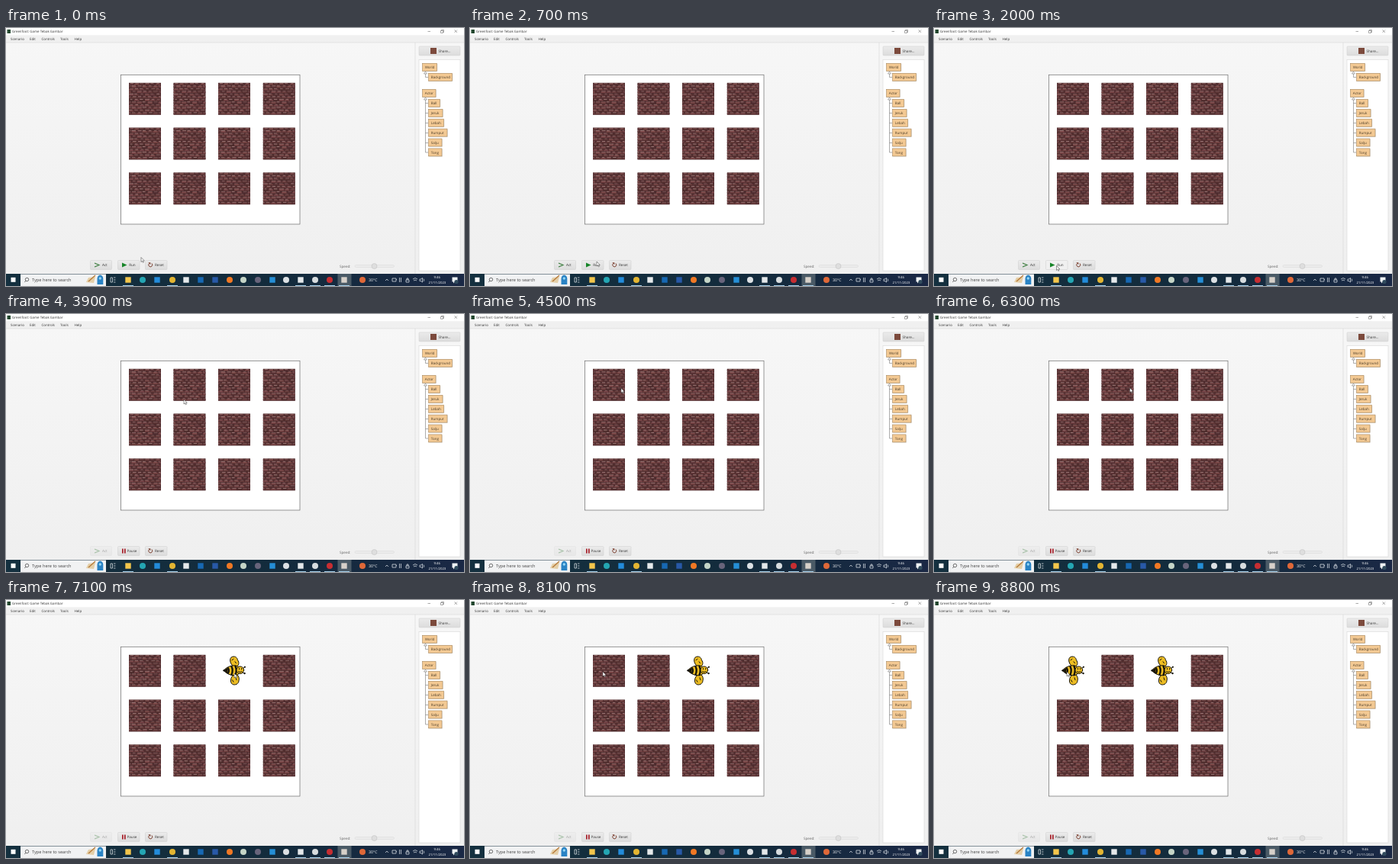
Animation, 600 px wide and 338 px high, one loop 9 s. Source, as an HTML page:

```html
<!DOCTYPE html>
<html lang="id">
<head>
<meta charset="utf-8">
<title>Game Tebak Gambar</title>
<style>
  html, body { margin: 0; width: 100%; height: 100%; overflow: hidden; background: #f4f4f4; }
  svg { display: block; width: 100vw; height: 100vh; }
  text { font-family: "Open Sans", "Noto Sans", sans-serif; text-rendering: geometricPrecision; white-space: pre; }
</style>
</head>
<body>
<svg id="stage" viewBox="0 0 600 338" preserveAspectRatio="none">
  <defs>
    <linearGradient id="paper" x2="0" y2="1"><stop stop-color="#f7f7f7"/><stop offset="1" stop-color="#efefef"/></linearGradient>
    <linearGradient id="button" x2="0" y2="1"><stop stop-color="#ebebeb"/><stop offset="1" stop-color="#dcdcdc"/></linearGradient>
    <linearGradient id="bar"><stop stop-color="#14303f"/><stop offset=".6" stop-color="#132b3c"/><stop offset="1" stop-color="#1a2845"/></linearGradient>
    <g id="wall"></g>
    <g id="bee" stroke="#14120c" stroke-width="1" stroke-linejoin="round" stroke-linecap="round">
      <path fill="#ecbc22" d="M20 15C15 12 14 4 18.500 2.500C23 1.500 25 4 25.500 7C28 10 27 14 24.500 15.500Z"/>
      <path fill="#ecbc22" d="M20.500 26C16 29 15 36 18.500 38.500C22 40.500 27 38 27 34C28 31 27 28 25 26Z"/>
      <path fill="#ecbc22" d="M7 20.500Q13 14 21 14Q28 14 29 20.500Q28 27 21 27Q13 27 7 20.500Z"/>
      <path fill="none" stroke-width="2.300" d="M13 17.500Q14.800 20.500 13 24M17.500 15.500Q20 20.500 17.500 26M22.500 15Q25 20.500 22.500 26.500"/>
      <path fill="#14120c" d="M7 20.500L12 18V23.500Z"/>
      <circle cx="28.800" cy="20" r="4.800" fill="#ecbc22"/>
      <path fill="none" d="M18 7L20 5.500M22 9L23.500 11M18.500 33L20 35.500M23 30L24 33M27.500 17.800V19M30.500 17.800V19M26.500 22Q29 24 31 22M32.500 18L34.500 16M32 23L34.500 24.500"/>
      <circle cx="34.800" cy="16" r=".6" fill="#14120c"/><circle cx="34.500" cy="24.300" r=".7" fill="#14120c"/>
    </g>
  </defs>

  <rect width="600" height="338" fill="url(#paper)"/>
  <rect width="600" height="9.500" fill="#fff"/>
  <rect y="9.500" width="600" height="9.500" fill="#f0f0f0"/>
  <path d="M0 19H600M536 19V322" stroke="#dadada" stroke-width=".7"/>
  <rect x="1.500" y="2" width="4.500" height="5" fill="#23482f"/>
  <path d="M552.500 4.500H556M569.500 3.500H572.500V6.500H569.500ZM570.500 3.500V2.500H573.500V5.500H572.500M587.500 2.500L591 6M591 2.500L587.500 6" fill="none" stroke="#555" stroke-width=".5"/>

  <rect x="150.500" y="61.300" width="234.500" height="195.700" fill="#fff" stroke="#6c6c6c" stroke-width=".7"/>
  <g id="cards"></g>

  <rect x="541" y="24" width="54" height="12" rx="1" fill="url(#button)" stroke="#cdcdcd" stroke-width=".5"/>
  <rect x="556" y="26" width="8" height="8" fill="#7c4a3c"/>
  <rect x="541" y="41.500" width="54" height="276.500" fill="#fff" stroke="#d8d8d8" stroke-width=".6"/>
  <path d="M549.500 60V64.500H553M549.500 94V163H553M549.500 98.500H553M549.500 111.500H553M549.500 124.500H553M549.500 137.500H553M549.500 150.500H553" fill="none" stroke="#777" stroke-width=".6"/>
  <path d="M549.500 57L547.500 60H551.500ZM549.500 91L547.500 94H551.500Z" fill="#fff" stroke="#666" stroke-width=".5"/>
  <g id="classes"></g>

  <g fill="url(#button)" stroke="#cdcdcd" stroke-width=".5">
    <rect id="runBox" x="146.500" y="304.500" width="28.500" height="12" rx="1"/>
    <rect x="182.500" y="304.500" width="28.500" height="12" rx="1"/>
  </g>
  <g id="act">
    <rect x="110.500" y="304.500" width="28" height="12" rx="1" fill="url(#button)" stroke="#cdcdcd" stroke-width=".5"/>
    <path d="M116 308L122 310.500L116 313" fill="none" stroke="#397b3c" stroke-width="1.100"/>
  </g>
  <g id="run"><path d="M152 307.500V313.500L158.500 310.500Z" fill="#168428"/></g>
  <g id="pause"><path d="M152 307.500H153.700V313.500H152ZM155 307.500H156.700V313.500H155Z" fill="#a8202a"/></g>
  <path d="M187.500 308.500A2.500 2.500 0 1 0 191 308.500" fill="none" stroke="#7c4030" stroke-width="1"/>
  <path d="M186.300 307.300H189.300V310Z" fill="#7c4030"/>
  <rect x="457" y="310.500" width="51.500" height="3" rx="1.500" fill="#ececec" stroke="#d6d6d6" stroke-width=".5"/>
  <circle cx="482.500" cy="312" r="3.500" fill="#dedede" stroke="#bcbcbc" stroke-width=".5"/>

  <rect y="322" width="600" height="16" fill="url(#bar)"/>
  <rect x="19" y="322.500" width="112" height="15.500" fill="#f1f2f3"/>
  <rect x="6.500" y="326.800" width="6" height="6" fill="#fff"/>
  <path d="M26 331.200L24.300 333" stroke="#333" stroke-width=".7"/>
  <circle cx="27.500" cy="329.500" r="2.200" fill="none" stroke="#333" stroke-width=".7"/>
  <path d="M105 333L108 327L117 326L115 334Z" fill="#e4cfa8"/><path d="M108 332L117 324" stroke="#b77a38" stroke-width="1.400"/>
  <path d="M119.500 336V328Q120 324 123.300 323.500Q127 324 127.300 328V336Z" fill="#2a83c4"/><circle cx="123.300" cy="328" r="1.700" fill="#93d5f4"/>
  <path d="M137 327H139.500V333H137ZM141 327H143.500M141 330H143.500M141 333H143.500" fill="none" stroke="#e8edf0" stroke-width=".7"/>
  <rect x="434.500" y="322" width="18" height="16" fill="#4a5a66"/>
  <g id="apps"></g>
  <g fill="none" stroke="#e9eef2" stroke-width=".7">
    <path d="M497 331L499 329L501 331M506 328H511V332H506ZM511 329.500H512M524 333V330H528V333ZM525 330V328H527V330M533 329Q536 326 539 329M534 331Q536 329 538 331M542 329H543.500L545.500 327.500V333L543.500 331.500H542ZM547 328.500Q548.500 330.300 547 332"/>
    <path d="M515.500 327V333M517.500 327V333"/>
  </g>
  <path d="M584.500 326.500H591.500V332.500H588L586 334.500V332.500H584.500Z" fill="#eef2f4"/>
  <circle cx="590" cy="332.500" r="2.600" fill="#304b5d"/>
  <g id="labels"></g>
  <path id="cursor" d="M0 0V6L1.400 4.700L2.400 6.800L3.400 6.300L2.500 4.400H4.300Z" fill="#fff" stroke="#333" stroke-width=".5"/>
</svg>
<script>
const $ = id => document.getElementById(id);

function add(parent, tag, attributes, content = '') {
  const node = document.createElementNS('http://www.w3.org/2000/svg', tag);
  for (const [key, value] of Object.entries(attributes)) node.setAttribute(key, value);
  node.textContent = content;
  return parent.appendChild(node);
}

const label = (parent, content, x, y, size = 4.6, fill = '#333') =>
  add(parent, 'text', { x, y, 'font-size': size, fill }, content);

let seed = 41;
function random() {
  seed = (seed * 16807) % 2147483647;
  return seed / 2147483647;
}

// Uneven bricks between broken, pale mortar lines.
function buildWall(wall) {
  const pitch = 3.5;
  add(wall, 'rect', { width: 42, height: 42, fill: '#4b2a2c' });
  for (let row = 0; row < 12; row++) {
    const y = row * pitch;
    for (let x = row % 2 ? -3.5 : 0; x < 42; x += 7) {
      const left = Math.max(0, x);
      const right = Math.min(42, x + 6.3);
      const width = right - left;
      add(wall, 'rect', {
        x: left, y: y + .9, width, height: 2,
        fill: `hsl(${356 + random() * 6} 27% ${25 + random() * 13}%)`
      });
      const start = left + random() * width * .3;
      add(wall, 'rect', {
        x: start, y: y + .1, width: (right - start) * (.6 + random() * .4), height: .9,
        fill: '#b38d8a', opacity: .4 + random() * .5
      });
    }
  }
}
buildWall($('wall'));

const columns = [161, 219.5, 278, 336.8];
const rows = [71.8, 130.5, 189.3];
const cards = rows.flatMap(y => columns.map(x => add($('cards'), 'use', { x, y })));

function classBox(name, x, y, width) {
  add($('classes'), 'rect', { x: x + .7, y: y + .7, width, height: 10, fill: '#dedad4' });
  add($('classes'), 'rect', { x, y, width, height: 10, fill: '#f3c993', stroke: '#a5875f', 'stroke-width': .6 });
  label($('classes'), name, x + 3.3, y + 6.7, 4.5, '#4a3b28');
}
classBox('World', 545.5, 46.3, 19);
classBox('Background', 553.5, 59.3, 31);
classBox('Actor', 545.5, 80.3, 17.5);
[['Ball', 15], ['Jeruk', 18.5], ['Lebah', 20], ['Rumput', 24.5], ['Salju', 17.5], ['Tong', 17.5]]
  .forEach(([name, width], i) => classBox(name, 553.5, 93.4 + i * 12.9, width));

const texts = $('labels');
label(texts, 'Greenfoot: Game Tebak Gambar', 8, 6.3, 4.42);
[['Scenario', 6], ['Edit', 31], ['Controls', 46.5], ['Tools', 71], ['Help', 89.5]]
  .forEach(([name, x]) => label(texts, name, x, 15.7, 4.45));
label(texts, 'Share...', 566.5, 31.7);
label($('act'), 'Act', 126, 312.2);
label($('run'), 'Run', 161.2, 312.2);
label($('pause'), 'Pause', 158.5, 312.2);
label(texts, 'Reset', 195, 312.2);
label(texts, 'Speed:', 437, 313.6, 4.6, '#666');
label(texts, 'Type here to search', 34, 332, 5.65, '#444');
label(texts, '30°C', 475, 332, 5.2, '#fff');
label(texts, '9:46', 560.5, 328.4, 4.3, '#fff');
label(texts, '21/11/2023', 553.5, 335, 4.3, '#fff');

const apps = [
  [160, '#f3c64c', 1], [179, '#24a6b3'], [198, '#238cdb', 1], [218, '#e3b532'],
  [236, '#e5e9eb', 1], [255, '#1768b3', 1], [274, '#2859a8', 1], [293, '#f07824'],
  [311, '#c5d5c7'], [330, '#68647b'], [349, '#258fd6', 1], [367, '#dce1e4'],
  [386, '#e4e8ea', 1], [405, '#d8dddf'], [424, '#c72e32'], [443, '#d7d1ca', 1], [467, '#df6838']
];
for (const [x, fill, square] of apps) {
  if (square) add($('apps'), 'rect', { x: x - 3.7, y: 326.3, width: 7.4, height: 7.4, fill });
  else add($('apps'), 'circle', { cx: x, cy: 330, r: 4, fill });
}
for (const x of [160, 218, 386, 405, 424, 443]) {
  add($('apps'), 'rect', { x: x - 7, y: 337, width: 14, height: 1, fill: '#a9d3ee' });
}

const cursorPath = [
  [0, 177, 300.5], [700, 166, 306], [1700, 166, 306], [2000, 160.5, 311.5],
  [3500, 160.5, 311.5], [3900, 233, 112], [4300, 204, 99], [4600, 195, 96.5],
  [5000, 195, 96.5], [5300, 245, 97], [5500, 245, 97], [5900, 246, 97],
  [6200, 246, 97], [6700, 299, 96], [7500, 299, 96], [8100, 174, 94], [9000, 174, 94]
];

function cursorAt(time) {
  const next = cursorPath.findIndex(point => point[0] > time);
  const [t0, x0, y0] = cursorPath[next - 1];
  const [t1, x1, y1] = cursorPath[next];
  const p = (time - t0) / (t1 - t0);
  return [x0 + (x1 - x0) * p, y0 + (y1 - y0) * p];
}

const show = (id, visible) => $(id).setAttribute('visibility', visible ? 'visible' : 'hidden');

function render(now) {
  const time = Math.floor((now % 9000) / 100) * 100;
  const running = time >= 2600;
  const open = [(time >= 4800 && time < 6300) || time >= 8800, false, time >= 7000];
  cards.forEach((card, i) => card.setAttribute('href', open[i] ? '#bee' : '#wall'));
  show('run', !running);
  show('pause', running);
  $('act').setAttribute('opacity', running ? .4 : 1);
  $('runBox').setAttribute('fill', time >= 1800 && time < 2600 ? '#f0f0f0' : 'url(#button)');
  $('cursor').setAttribute('transform', `translate(${cursorAt(time)})`);
}

const begin = performance.now();
function tick() {
  render(performance.now() - begin);
  requestAnimationFrame(tick);
}
tick();
</script>
</body>
</html>
```
